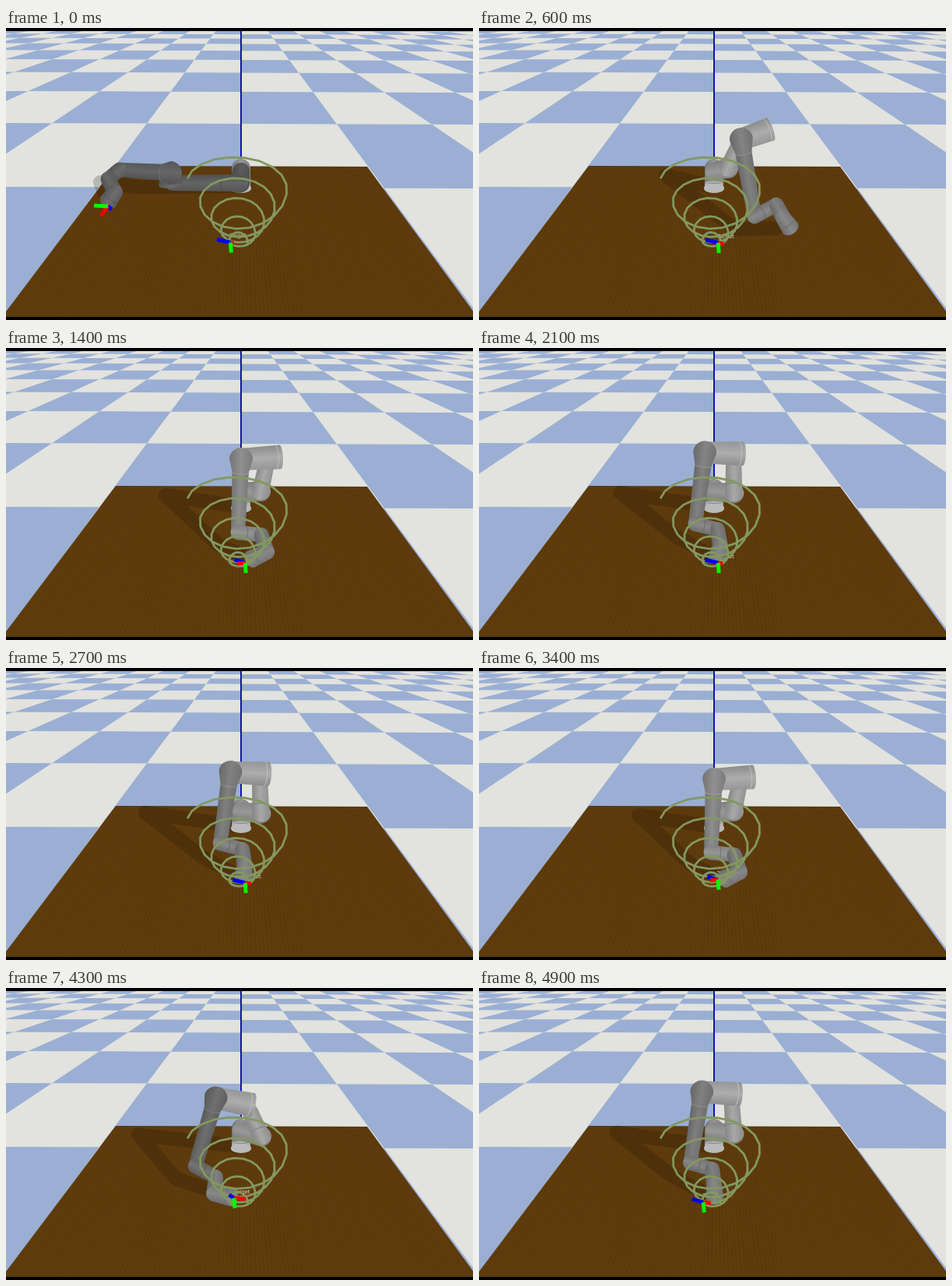
An HTML page with a canvas for the animation above (5000 ms loop, 600x375 px).

```html
<!DOCTYPE html>
<html lang="en">
<head>
<meta charset="utf-8">
<title>Robot arm tracking a spiral</title>
<style>
html, body { margin: 0; width: 100%; height: 100%; overflow: hidden; background: #000; }
canvas { display: block; width: 600px; height: 375px; }
</style>
</head>
<body>
<canvas id="stage" width="600" height="375"></canvas>
<script>
const W = 600, H = 375, LOOP = 5000, STEP = 100, TAU = Math.PI * 2;
const VX = 303, VY = -41;
const ctx = document.getElementById('stage').getContext('2d');

// Each pose: shoulder, arm joint, elbow cap, elbow corner, wrist, wrist end, hand, tool
const HOME = [[300, 199], [214, 199], [212, 202], [211, 186], [146, 182], [131, 194], [140, 211], [131, 223]];
const REACH = [[320, 180], [334, 150], [374, 130], [337, 143], [354, 242], [382, 227], [391, 244], [400, 257]];
const LEFT = [[328, 191], [312, 162], [314, 154], [267, 144], [239, 231], [265, 246], [262, 267], [288, 269]];
const RIGHT = [[327, 184], [335, 148], [352, 140], [302, 143], [298, 237], [328, 240], [335, 262], [315, 271]];

const clamp = v => Math.max(0, Math.min(1, v));
const ease = v => { const u = clamp(v); return u * u * (3 - 2 * u); };
const lerp = (a, b, k) => a + (b - a) * k;
const mix = (a, b, k) => [lerp(a[0], b[0], k), lerp(a[1], b[1], k)];
const mixPose = (a, b, k) => a.map((p, i) => mix(p, b[i], k));
const add = (p, x, y) => [p[0] + x, p[1] + y];
const gray = v => `rgb(${v},${v},${v})`;

// Base swing, 0 left to 1 right, growing wider with time
function swing(t) {
  const drift = (t - 1400) / 3500;
  const center = .8 - .25 * drift * drift;
  const width = .2 + .65 * (t / 4900) ** 4;
  return clamp(center + width * Math.cos(TAU * (t - 1400) / 2000));
}

function poseAt(t) {
  if (t < 600) return mixPose(HOME, REACH, ease(t / 600));
  const q = swing(t), lift = 40 * q * (1 - q);
  const track = mixPose(LEFT, RIGHT, q).map((p, i) => i > 0 && i < 7 ? add(p, 0, -lift) : p);
  return mixPose(REACH, track, ease((t - 600) / 800));
}

function targetAt(t) {
  const deg = 163 - 140 * ease(t / 600) - 217 * clamp((t - 2700) / 2200) ** 1.3;
  const a = deg * TAU / 360;
  return [298 + 10 * Math.cos(a), 274 + 5 * Math.sin(a)];
}

function poly(c, pts, fill) {
  c.beginPath();
  pts.forEach(p => c.lineTo(p[0], p[1]));
  c.fillStyle = fill;
  c.fill();
}

function line(pts, color, width) {
  ctx.strokeStyle = color;
  ctx.lineWidth = width;
  ctx.beginPath();
  pts.forEach(p => ctx.lineTo(p[0], p[1]));
  ctx.stroke();
}

function makeScene() {
  const cv = document.createElement('canvas');
  cv.width = W;
  cv.height = H;
  const c = cv.getContext('2d');
  c.fillStyle = '#e2e2de';
  c.fillRect(0, 0, W, H);
  const spot = (col, z) => {
    const x = VX + 366 * col / z;
    return [x, VY + 492 / z + .0035 * (x - 300)];
  };
  for (let z = 1; z < 12; z++)
    for (let col = -12; col < 12; col++)
      if ((z + col) & 1)
        poly(c, [spot(col, z), spot(col + 1, z), spot(col + 1, z + 1), spot(col, z + 1)], '#9aafd3');

  c.save();
  poly(c, [[141, 177], [464, 178], [605.5, 371], [-5, 371]], '#5f3c0d');
  c.clip();
  c.lineWidth = 1;
  for (let i = -300; i <= 300; i++) {
    const wave = Math.sin(i * 2.4) + Math.sin(i * 5.1);
    c.strokeStyle = wave > 0 ? `rgba(125,78,20,${wave * .06})` : `rgba(40,20,0,${-wave * .06})`;
    c.beginPath();
    c.moveTo(VX + i * .55, 177);
    c.lineTo(VX + i * 1.04, 371);
    c.stroke();
  }
  c.restore();

  c.fillStyle = '#000';
  c.fillRect(0, 0, W, 4);
  c.fillRect(0, 371, W, 4);
  c.fillStyle = '#1212b4';
  c.fillRect(301, 4, 2, 172);
  return cv;
}
const scene = makeScene();

// Tapered bar shaded across its width; round sets how far the far end bulges
function tube(a, b, ra, rb, shade, round = 1) {
  const ang = Math.atan2(b[1] - a[1], b[0] - a[0]), q = Math.PI / 2;
  const side = Math.sin(ang) > 0 ? -1 : 1, r = Math.max(ra, rb) * side;
  const nx = -Math.sin(ang) * r, ny = Math.cos(ang) * r;
  const g = ctx.createLinearGradient(a[0] - nx, a[1] - ny, a[0] + nx, a[1] + ny);
  g.addColorStop(0, gray(shade * .84));
  g.addColorStop(.5, gray(shade * 1.05));
  g.addColorStop(1, gray(shade * .9));
  ctx.fillStyle = g;
  ctx.beginPath();
  ctx.arc(a[0], a[1], ra, ang + q, ang - q);
  ctx.ellipse(b[0], b[1], rb * round, rb, ang, -q, q);
  ctx.fill();
}

// Seam ring around a bar at share k of its length
function seam(a, b, k, r, shade) {
  const p = mix(a, b, k), ang = Math.atan2(b[1] - a[1], b[0] - a[0]);
  ctx.strokeStyle = gray(shade);
  ctx.lineWidth = 1;
  ctx.beginPath();
  ctx.ellipse(p[0], p[1], r * .22, r, ang, -Math.PI / 2, Math.PI / 2);
  ctx.stroke();
}

// Conical spiral seen from above; s counts half turns inwards
function spiralPoint(s) {
  const r = 60 - 8.3 * s + .25 * s * s;
  const up = Math.sin(Math.PI * s);
  const amp = r * (.6 + .06 * s) * (up > 0 ? 1.26 - .09 * s : 1);
  return [301 + r * Math.cos(Math.PI * s), 209 + 12.2 * s - .45 * s * s + amp * up];
}
const spiral = Array.from({ length: 91 }, (_, i) => spiralPoint(-.97 + i * .1));

function drawBase() {
  tube([302, 180], [302, 199], 12, 12, 142);
  poly(ctx, [[291, 197], [313, 197], [315, 207], [289, 207]], gray(178));
  ctx.fillStyle = gray(186);
  ctx.beginPath();
  ctx.ellipse(302, 206, 13, 6, 0, 0, TAU);
  ctx.fill();
  seam([302, 190], [302, 204], .5, 11.5, 135);
}

function drawArm(pose, rise, q) {
  const [shoulder, joint, cap, corner, wrist, bend, hand, tool] = pose;
  const top = lerp(98, 165, rise), fore = lerp(95, 102 + 32 * q, rise), end = lerp(98, 122, rise);
  tube([302, 184], shoulder, 11, 13, top * .88);
  tube(shoulder, joint, 11, 10, top * .97);
  seam(shoulder, joint, .25, 11, top * .75);
  tube(corner, cap, 14, 15.5, top, .25);
  seam(corner, cap, .9, 15.5, top * 1.15);
  tube(corner, wrist, 11, 9, fore);
  tube(corner, mix(corner, wrist, .16), 15, 11, fore * 1.02, .3);
  seam(corner, wrist, .18, 11, fore * 1.2);
  tube(wrist, bend, 9.5, 9, fore * 1.06);
  seam(wrist, bend, .35, 9, fore * .85);
  tube(bend, hand, 9.5, 10, end);
  tube(hand, tool, 10, 11.5, end * 1.06, .7);
  seam(hand, tool, .6, 11, end * .85);
}

function drawShadow(pose) {
  const corner = pose[3], tall = (215 - corner[1]) / 72;
  const knee = add(corner, -97 * tall, 46 * tall), end = add(pose[4], -25, 16);
  ctx.lineCap = ctx.lineJoin = 'round';
  line([[296, 203], knee, end, mix(end, pose[7], .75)], 'rgba(20,10,0,.2)', 18);
}

function drawAxes(o, green, red, blue) {
  line([o, add(o, ...blue)], '#0000f5', 5);
  line([o, add(o, ...red)], '#fa0000', 5);
  line([o, add(o, ...green)], '#00fa00', 5);
}

function render(t) {
  const pose = poseAt(t), q = swing(t), o = targetAt(t);
  ctx.drawImage(scene, 0, 0);
  drawShadow(pose);
  ctx.fillStyle = '#e8e4dc';
  ctx.font = '7px "DejaVu Sans", sans-serif';
  ctx.fillText('Target', o[0] - 1, o[1] - 6);
  drawBase();
  drawArm(pose, ease(t / 600), q);
  ctx.lineCap = 'butt';
  line(spiral, '#83985f', 2.8);
  const yaw = (20 + 110 * q * q) * TAU / 360;
  drawAxes(o, [1, 13], [16 * Math.cos(yaw), 1], [-18 * Math.sin(yaw), -4]);
  if (t < 400) drawAxes(add(pose[7], 0, 6), [-18, -1], [-9, 12], [5, 4]);
}

const start = performance.now();
function tick() {
  const t = (performance.now() - start) % LOOP;
  render(Math.floor(t / STEP) * STEP);
  requestAnimationFrame(tick);
}
tick();
</script>
</body>
</html>
```
